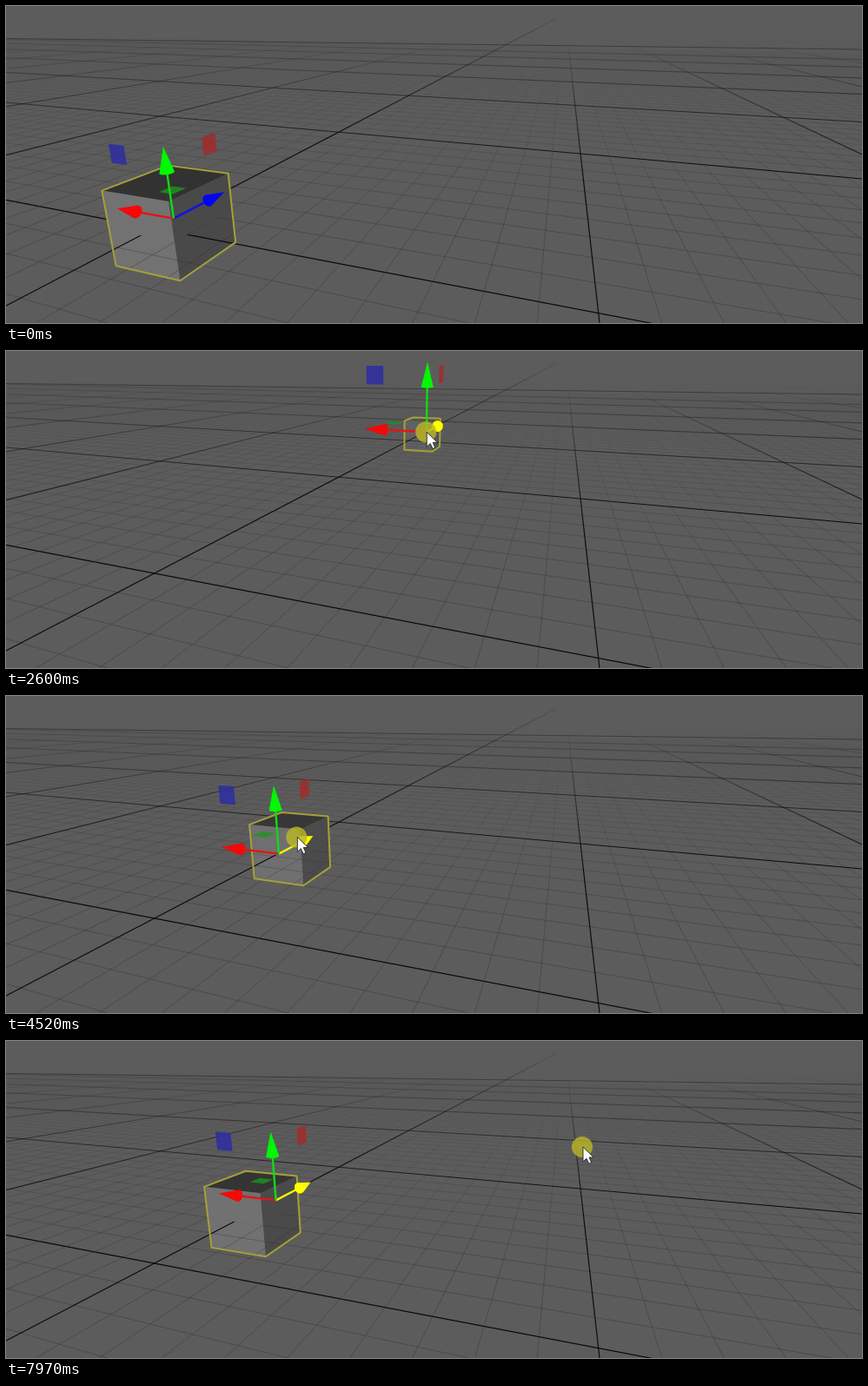
An HTML page with a canvas for the animation above (8000 ms loop, 985 by 365 pixels).

```html
<!DOCTYPE html>
<html lang="en">
<head>
<meta charset="utf-8">
<title>Moving a cube along its axis</title>
<style>
html, body { margin: 0; width: 100%; height: 100%; overflow: hidden; background: #5c5c5c; }
canvas { display: block; }
</style>
</head>
<body>
<canvas id="stage" width="985" height="365"></canvas>
<script>
const W = 985, H = 365, LOOP = 8000, LAG = 45;
const ctx = document.getElementById('stage').getContext('2d');

// Camera: focal length, principal point, pitch, yaw; units are grid cells
const FOCAL = 531.2, CX = 452, CY = 161, EYE = 5;
const SP = 0.2734, CP = 0.9618, SY = 0.328, CYAW = 0.9447;
const ORIGIN = [-5.938, 10.25], NEAR = 12.36;

// a runs left, h up, b into the distance
function toCamera([a, h, b]) {
  const r = ORIGIN[0] - CYAW * a + SY * b;
  const f = ORIGIN[1] + SY * a + CYAW * b;
  return [r, -SP * f - CP * (h - EYE), CP * f - SP * (h - EYE)];
}
function project(p) {
  const [x, y, z] = toCamera(p);
  return [CX + FOCAL * x / z, CY + FOCAL * y / z];
}

// The drag is smooth on screen, so depth is eased as its inverse
const near = u => 1 / (u + NEAR);
const DRAG = [
  [810, .6], [2420, 25.6], [4070, 0], [4520, 6.2], [4930, 15.1],
  [5870, 24.6], [6950, 32.6], [7400, 28.3], [7970, 4]
].map(([t, u]) => [t, near(u)]);

// Time, x, y
const POINTER = [
  [0, 306, 390], [780, 236, 222], [1930, 432, 108], [2420, 497, 86], [3220, 350, 164],
  [4070, 222, 232], [4930, 450, 102], [5870, 498, 105], [7970, 663, 122]
];

// Smooth curve through the keys that never overshoots
function sample(keys, t, col = 1) {
  const last = keys.length - 1;
  if (t <= keys[0][0]) return keys[0][col];
  if (t >= keys[last][0]) return keys[last][col];
  let i = 0;
  while (keys[i + 1][0] < t) i++;
  const slope = k => (keys[k + 1][col] - keys[k][col]) / (keys[k + 1][0] - keys[k][0]);
  const tangent = k => {
    if (k === 0) return 0;
    if (k === last) return (3 * slope(k - 1) - tangent(k - 1)) / 2;
    const s = slope(k - 1), n = slope(k);
    return s * n <= 0 ? 0 : 2 * s * n / (s + n);
  };
  const span = keys[i + 1][0] - keys[i][0], q = (t - keys[i][0]) / span;
  const q2 = q * q, q3 = q2 * q, ease = 3 * q2 - 2 * q3;
  return keys[i][col] * (1 - ease) + keys[i + 1][col] * ease +
    span * (tangent(i) * (q3 - 2 * q2 + q) + tangent(i + 1) * (q3 - q2));
}
const depthAt = t => 1 / sample(DRAG, t) - NEAR;

function path(c, pts, closed = true) {
  c.beginPath();
  pts.forEach(([x, y]) => c.lineTo(x, y));
  if (closed) c.closePath();
}
function fill(pts, color) {
  path(ctx, pts);
  ctx.fillStyle = color;
  ctx.fill();
}

function makeGrid() {
  const cv = document.createElement('canvas');
  cv.width = W;
  cv.height = H;
  const g = cv.getContext('2d');
  const va = [-1106, 12.2], vb = [643, 9.4];

  // Lines fade in from the horizon towards the viewer
  const fade = (shade, top, full, alpha) => {
    const grad = g.createLinearGradient(0, top, 0, full);
    grad.addColorStop(0, `rgba(${shade},${shade},${shade},0)`);
    grad.addColorStop(1, `rgba(${shade},${shade},${shade},${alpha})`);
    return grad;
  };
  const minor = fade(46, 35, 260, .38);
  const across = fade(8, 18, 190, 1);
  const away = fade(8, 38, 200, .95);
  const axis = fade(8, 2, 150, 1);
  const line = (x1, y1, x2, y2, style, w = 1) => {
    g.strokeStyle = style;
    g.lineWidth = w;
    path(g, [[x1, y1], [x2, y2]], false);
    g.stroke();
  };

  for (let b = -5; b < 70; b++) {
    const y = 10 + 1 / (.004065 + .0003331 * b), x = 660.9 - 1.9157 * y;
    const end = va[1] + (y - va[1]) * (W - va[0]) / (x - va[0]);
    line(...va, W, end, b % 10 ? minor : across, b % 10 ? 1 : 1.2);
  }
  for (let i = -160; i <= 110; i++) {
    const foot = 683 + 71.7 * i - .04 * i * i;
    if (i === -10) line(634, 14, foot, H, axis, 1.2);
    else line(...vb, foot, H, i % 10 ? minor : away, i % 10 ? 1 : 1.2);
  }
  line(0, 37.5, W, 50, 'rgba(25,25,25,.45)');
  return cv;
}
const grid = makeGrid();

function drawCube(u) {
  const v = (a, h, b) => project([a, h, u + b]);
  const flt = v(1, 1, -1), frt = v(-1, 1, -1), brt = v(-1, 1, 1), blt = v(1, 1, 1);
  const flb = v(1, -1, -1), frb = v(-1, -1, -1), brb = v(-1, -1, 1);
  const flm = v(1, 0, -1), frm = v(-1, 0, -1), brm = v(-1, 0, 1);
  const fog = Math.min(1, Math.max(0, (u - 3) / 26));
  const shade = s => {
    const n = Math.round(s + (92 - s) * fog);
    return `rgb(${n},${n},${n})`;
  };
  fill([flt, frt, brt, blt], shade(50));
  fill([frt, brt, brb, frb], shade(73));
  fill([flt, frt, frb, flb], shade(114));

  // The lower half lies under the ground plane, so the grid shows over it
  ctx.save();
  path(ctx, [flm, frm, brm, brb, frb, flb]);
  ctx.clip();
  ctx.drawImage(grid, 0, 0);
  ctx.restore();

  path(ctx, [flt, blt, brt, brb, frb, flb]);
  ctx.strokeStyle = '#a5a038';
  ctx.lineWidth = 2;
  ctx.lineJoin = 'round';
  ctx.stroke();
}

// Axes are indexed a, h, b
function drawGizmo(u, hover) {
  const size = .144 * Math.hypot(...toCamera([0, 0, u]));
  const on = (axis, d, s = 0, r = 0) => {
    const p = [0, 0, u];
    [d, s, r].forEach((n, i) => p[(axis + i) % 3] += n * size);
    return project(p);
  };
  const handle = (axis, color) => {
    const lo = .68, hi = .95;
    fill([[lo, lo], [hi, lo], [hi, hi], [lo, hi]].map(([s, r]) => on(axis, 0, s, r)), color);
  };
  const arrow = (axis, color, shaft) => {
    const base = .65, sides = 20, ring = [];
    path(ctx, [on(axis, 0), on(axis, base)], false);
    ctx.strokeStyle = shaft;
    ctx.lineWidth = 2.4;
    ctx.stroke();
    for (let i = 0; i < sides; i++) {
      const w = i * 2 * Math.PI / sides;
      ring.push(on(axis, base, .088 * Math.cos(w), .088 * Math.sin(w)));
    }
    fill(ring, color);
    const tip = on(axis, 1);
    ring.forEach((p, i) => fill([tip, p, ring[(i + 1) % sides]], color));
  };
  handle(2, 'rgba(46,46,160,.88)');
  handle(0, 'rgba(160,44,44,.88)');
  handle(1, 'rgba(28,150,28,.8)');
  arrow(2, hover ? '#ffff00' : '#0505f5', hover ? '#f0f010' : '#1010e6');
  arrow(0, '#f80808', '#e01616');
  arrow(1, '#00fa00', '#14d814');
}

function drawPointer(x, y) {
  ctx.beginPath();
  ctx.arc(x, y, 12, 0, 2 * Math.PI);
  ctx.fillStyle = 'rgba(186,182,38,.82)';
  ctx.fill();
  const shape = [[0, 0], [0, 17], [4, 13.2], [6.8, 19.2], [9.6, 18], [7, 12], [12.2, 12]];
  fill(shape.map(([dx, dy]) => [x + 1 + dx, y + dy]), '#fff');
  ctx.strokeStyle = '#222';
  ctx.lineWidth = .9;
  ctx.lineJoin = 'miter';
  ctx.stroke();
}

function draw(t) {
  ctx.fillStyle = '#5c5c5c';
  ctx.fillRect(0, 0, W, H);
  ctx.drawImage(grid, 0, 0);
  drawCube(depthAt(t));
  // The handles trail slightly behind the cube
  drawGizmo(depthAt(t - LAG), t > 700);
  drawPointer(sample(POINTER, t, 1), sample(POINTER, t, 2));
}

let start;
function tick(now) {
  start ??= now;
  draw((now - start) % LOOP);
  requestAnimationFrame(tick);
}
draw(0);
requestAnimationFrame(tick);
</script>
</body>
</html>
```
